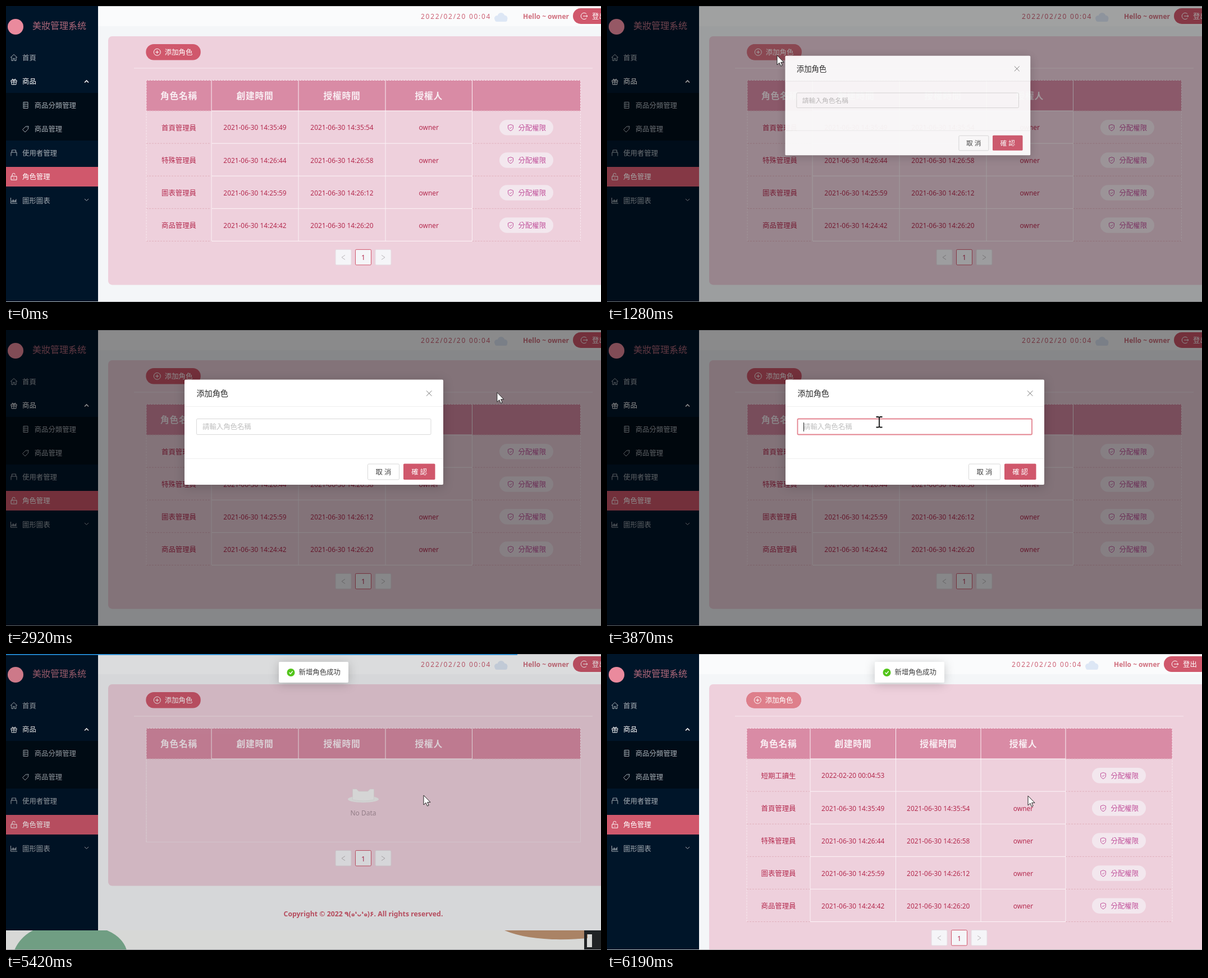
Recreate the animation shown at these times as an HTML page. Size 1060 px wide and 528 px high, loop 6740 ms.

```html
<!DOCTYPE html>
<html lang="zh-Hant">
<head>
<meta charset="utf-8">
<title>角色管理</title>
<style>
html, body { margin: 0; width: 100%; height: 100%; overflow: hidden; }
svg { display: block; width: 100%; height: 100%; font-family: "Noto Sans", "Noto Sans CJK TC", "Noto Sans CJK", "DejaVu Sans", sans-serif; }
text { white-space: pre; }
.pop { filter: drop-shadow(0 3px 9px rgba(0,0,0,.2)); }
.hover { opacity: var(--hover); }
</style>
</head>
<body>
<svg id="stage" viewBox="0 0 1060 528"></svg>
<script>
const LOOP = 6740, MAIN = '#d0586c', LIGHT = '#de7f8b', WINE = '#b52c50';
const MID = 'text-anchor="middle"', BOLD = 'font-weight="700"';
const stage = document.getElementById('stage');

// markup helpers; text is placed by its vertical centre
const text = (x, y, s, fill, size = 12.4, more = '') =>
  `<text x="${x}" y="${y}" dy=".37em" fill="${fill}" font-size="${size}" ${more}>${s}</text>`;
const rect = (x, y, w, h, fill, more = '') =>
  `<rect x="${x}" y="${y}" width="${w}" height="${h}" fill="${fill}" ${more}/>`;
const path = (x, y, d, stroke, more = 'fill="none"') =>
  `<path transform="translate(${x} ${y})" d="${d}" stroke="${stroke}" ${more}/>`;
const icon = (x, y, name, color) => path(x, y, icons[name], color);
const line = (d, color, dash) => path(0, 0, d, color, dash ? 'fill="none" stroke-dasharray="3 2"' : 'fill="none"');

const icons = {
  home: 'M-6 0L0-5.5L6 0M-4-1V5.5H-1.2V1.5H1.2V5.5H4V-1',
  gift: 'M-5-2H5V1H-5ZM-4 1V5.5H4V1M0-2V5.5M0-2C-5-2-3-7 0-2C3-7 5-2 0-2',
  list: 'M-4-5.5H4V5.5H-4ZM-4-1.8H4M-4 1.8H4M-2.2-3.6H-1M-2.2 0H-1M-2.2 3.6H-1',
  tag: 'M-5.5 1L0-4.5L5-5L4.5 0L-1 5.5ZM2-2.4h.8',
  user: 'M-3.5-1V-5H3.5V-1M-5 5.5V-1H5V5.5',
  lock: 'M-5-1H5V5.5H-5ZM-3-1V-3.5A2.6 2.6 0 0 1 2.2-3.8M0 1.4V3.2',
  chart: 'M-5.5-5V5H6M-3.5 3V0M-2 3V-1.5M-.5 3V-1.5M1 3V0M2.5 3V-1M4 3V-2.5',
  shield: 'M0-5.5L4.5-4V0C4.5 3 2 4.8 0 5.5C-2 4.8-4.5 3-4.5 0V-4ZM-2 0L-.5 1.5L2.3-1.5',
  plus: 'M-6 0a6 6 0 1 0 12 0a6 6 0 1 0-12 0M-3 0H3M0-3V3',
  exit: 'M4-4A5.7 5.7 0 1 0 4 4M-2 0H6M4-2L6 0L4 2',
  up: 'M-3.5 2L0-1.5L3.5 2', down: 'M-3.5-2L0 1.5L3.5-2',
  left: 'M3-4L-3 0L3 4', right: 'M-3-4L3 0L-3 4',
  close: 'M-4.7-4.7L4.7 4.7M4.7-4.7L-4.7 4.7'
};

function sidebar(height) {
  const dim = '#a6adb4', white = '#fff';
  const items = [
    ['home', '首頁', 92, dim], ['gift', '商品', 134.5, white],
    ['list', '商品分類管理', 177, dim, 21], ['tag', '商品管理', 219.5, dim, 21],
    ['user', '使用者管理', 262, dim], ['lock', '角色管理', 304.7, white], ['chart', '圖形圖表', 347, dim]
  ];
  return rect(0, 0, 164, height, '#001529') + rect(0, 155, 164, 85, '#000c17') + rect(0, 287, 164, 35, MAIN) +
    '<circle cx="17" cy="37" r="14" fill="#ea8a9d"/>' +
    text(47, 35, '美妝管理系统', '#b0687a', 16, 'font-weight="500"') +
    items.map(([name, label, y, color, indent = 0]) =>
      icon(14 + indent, y, name, color) + text(29 + indent * 1.03, y, label, color)).join('') +
    path(143.5, 134.5, icons.up, white, 'fill="none" stroke-width="1.6"') + icon(143.5, 346, 'down', dim);
}

function topbar(dx) {
  const cloud = [[875, 22, 5], [882, 18.5, 6.5], [888, 22, 5.5]]
    .map(([x, y, r]) => `<circle cx="${x}" cy="${y}" r="${r}"/>`).join('') + rect(871, 21, 22, 7, '#dde7f5', 'rx="3.5"');
  return rect(164, 0, 896, 36, '#fafbfc') +
    `<g transform="translate(${dx} 0)"><g fill="#dde7f5">${cloud}</g>` +
    text(739, 18.5, '2022/02/20 00:04', '#cc6175', 12, 'letter-spacing="1.72"') +
    text(921, 18.5, 'Hello ~ owner', '#d0707f', 12, BOLD) +
    rect(1010, 4, 80, 28, MAIN, 'rx="14"') + icon(1030, 18, 'exit', '#fff') + text(1044, 18, '登出', '#fff') + '</g>';
}

const oldRows = [
  ['首頁管理員', '2021-06-30 14:35:49', '2021-06-30 14:35:54', 'owner'],
  ['特殊管理員', '2021-06-30 14:26:44', '2021-06-30 14:26:58', 'owner'],
  ['圖表管理員', '2021-06-30 14:25:59', '2021-06-30 14:26:12', 'owner'],
  ['商品管理員', '2021-06-30 14:24:42', '2021-06-30 14:26:20', 'owner']
];
const newRow = ['短期工讀生', '2022-02-20 00:04:53', '', ''];
const wide = [250, 366, 521, 676, 830.5, 1023.5], narrow = [249, 362, 514.5, 666, 817, 1007];

function table(cols, rows) {
  const [a, b, , , e, f] = cols, top = 132.5, head = 187, step = 58.1;
  const bottom = rows.length ? head + rows.length * step : 335.5;
  const mid = i => (cols[i] + cols[i + 1]) / 2;
  let out = rect(a, top, f - a, head - top, '#d98ba5');
  ['角色名稱', '創建時間', '授權時間', '授權人'].forEach((s, i) =>
    out += text(mid(i), 160, s, '#f9eef3', 15.8, `${MID} ${BOLD} letter-spacing=".7"`));
  rows.forEach((row, r) => {
    const y = head + (r + .5) * step + 1, low = head + (r + 1) * step;
    row.forEach((s, i) => out += text(mid(i), y, s, WINE, i ? 11.9 : 12.4, MID));
    out += rect(mid(4) - 48, y - 14, 96, 27.5, '#f3e7ee', 'rx="13.7"') +
      icon(mid(4) - 28, y, 'shield', '#c0509a') + text(mid(4) - 14.5, y, '分配權限', '#c0509a') +
      line(`M${a} ${low}H${b}M${e} ${low}H${f}`, '#e0b0bc', true) + line(`M${b} ${low}H${e}`, '#fdf5f8');
  });
  const end = rows.length ? bottom : head;
  out += cols.slice(1, 5).map(x => line(`M${x} ${top}V${end}`, '#fbf1f5')).join('') +
    line(`M${b} ${head}H${e}`, '#fff') + line(`M${a} ${head}H${b}M${e} ${head}H${f}`, '#e3b4c2', true) +
    line(`M${a} ${bottom}V${top}H${f}V${bottom}`, '#f8e9ef', true);
  if (!rows.length) out += line(`M${a} ${head}V${bottom}H${f}V${head}`, '#f1dfe7') +
    '<ellipse cx="636.5" cy="259" rx="27.5" ry="6" fill="#efefef"/>' +
    path(636.5, 250, 'M-19-9H-12L-8-5H8L12-9H19V10Q0 14-19 10Z', '#ddd', 'fill="#f3f3f3" stroke-width=".5"') +
    text(636.5, 283.5, 'No Data', '#a88f9b', 12, MID);
  return [out, bottom];
}

// picture behind the layout, seen below a short page
const backdrop = '<path d="M15 528Q25 505 48 493H180Q208 505 215 528Z" fill="#80b596"/>' +
  '<path d="M888 493H1036V507Q940 515 888 493Z" fill="#c29673"/>' +
  '<path d="M1030 493H1060V528H1030ZM1035 500V523H1044V500Z" fill="#25282a" fill-rule="evenodd"/>';

function page(cols, rows) {
  const [grid, bottom] = table(cols, rows), empty = !rows.length;
  const shift = cols === narrow ? -18 : 0, height = empty ? 493 : 528;
  const x = cols[0] - .7, y = bottom + 15, c = 636.5 + shift / 2;
  let out = rect(0, 0, 1060, 528, '#f6f7f5') + backdrop +
    rect(164, 0, 896, height, '#f4f6f8') + topbar(shift) +
    rect(182, 54, 900, bottom + 24, '#eed0dc', 'rx="7"') +
    line(`M228 111H${1045 + shift}`, '#f8e8ee') +
    rect(x, 68, 97.5, 28.5, MAIN, 'rx="14"') + rect(x, 68, 97.5, 28.5, LIGHT, 'rx="14" class="hover"') +
    icon(x + 20, 82.3, 'plus', '#fff') + text(x + 33.5, 82.5, '添加角色', '#fff') + grid;
  ['left', 0, 'right'].forEach((name, i) => {
    const px = c + (i - 1) * 35.5;
    out += rect(px - 14, y, 28, 27.5, '#f5f5f8', `rx="1.8" stroke="${name ? '#e4dbe1' : MAIN}"`) +
      (name ? icon(px, y + 14, name, '#b9b5b8') : text(px, y + 14.5, '1', WINE, 12.2, MID));
  });
  if (empty) out += text(636.5, 463, 'Copyright © 2022 ٩(๑❛ᴗ❛๑)۶. All rights reserved.', '#d0586c', 12.3,
    `${MID} font-weight="600" style="unicode-bidi:bidi-override"`);
  return `<g>${out}${sidebar(height)}${line('M164 .5H1060M0 527.5H1060', '#b4b6b9')}</g>`;
}

const modal = '<g id="modal">' + rect(318, 88.5, 461, 187.5, '#fff', 'rx="2" class="pop"') +
  text(339.5, 113, '添加角色', '#262626', 14.1) + icon(753.7, 113, 'close', '#777') +
  line('M318 136.5H779M318 229.5H779', '#efefef') +
  rect(339.5, 158.5, 417.5, 28, '#fff', 'id="field" rx="1.8"') +
  text(350, 172.8, '', '#bfbfbf', 12.4, 'id="entry"') + rect(350, 165, 1, 16, '#222', 'id="caret"') +
  rect(644.5, 239, 56, 28, '#fff', 'rx="1.8" stroke="#d9d9d9"') + text(672.5, 253, '取 消', '#444', 12.4, MID) +
  rect(708, 238.5, 56.5, 28.5, MAIN, 'id="confirm" rx="1.8"') + text(736.2, 253, '確 認', '#fff', 12.4, MID) + '</g>';

const notice = '<g id="notice">' + rect(486, 14, 124, 37, '#fff', 'rx="2" class="pop"') +
  '<circle cx="507.5" cy="33" r="7" fill="#52c41a"/>' +
  path(507.5, 33, 'M-3 0L-.7 2.4L3.2-2.4', '#fff', 'fill="none" stroke-width="1.5"') +
  text(521.5, 32.5, '新增角色成功', '#3d3d3d') + '</g>';

const cursor = '<g id="cursor">' +
  path(0, 0, 'M0 0V17L4 13.3L6.6 19.2L9.2 18L6.7 12.4H12Z', '#222', 'fill="#fff"') +
  path(0, 0, 'M-1.7 12V1.7a1.7 1.7 0 0 1 3.4 0V7.5l6.6 1.4q2 .5 1.7 2.5L9 18q-.5 3-3 3.5H1Q-1 21-2 19L-7 12.5q0-2.5 2.5-1.5ZM1.7 7.5V11M4.5 8V11.3M7.2 8.6V11.8', '#222', 'fill="#fff"') +
  path(0, 0, 'M-5.5-9H-1.5L0-8L1.5-9H5.5M-5.5 9.5H-1.5L0 8.5L1.5 9.5H5.5M0-8V8.5', '#111', 'fill="none" stroke-width="1.8"') + '</g>';

stage.innerHTML = '<g id="pages">' + page(wide, oldRows) + page(wide, []) + page(narrow, [newRow, ...oldRows]) + '</g>' +
  rect(0, 0, 1060, 528, '#000', 'id="mask"') + modal + notice + rect(0, 0, 0, 1.8, '#2388cf', 'id="bar"') + cursor;

const el = id => document.getElementById(id);
const set = (node, attrs) => { for (const k in attrs) node.setAttribute(k, attrs[k]); };
const clamp = v => Math.min(1, Math.max(0, v));

function bezier(x1, y1, x2, y2) {
  const f = (a, b, u) => 3 * a * u * (1 - u) ** 2 + 3 * b * u * u * (1 - u) + u ** 3;
  return x => {
    let lo = 0, hi = 1;
    for (let i = 0; i < 20; i++) {
      const m = (lo + hi) / 2;
      if (f(x1, x2, m) < x) lo = m; else hi = m;
    }
    return f(y1, y2, lo);
  };
}
const ease = bezier(.25, .1, .25, 1), zoomIn = bezier(.08, .82, .17, 1), zoomOut = bezier(.78, .14, .15, .86);

// linear track of [time, ...values]
function track(keys, t) {
  const i = keys.findIndex(k => k[0] > t);
  if (i < 0) return keys[keys.length - 1].slice(1);
  if (i === 0) return keys[0].slice(1);
  const a = keys[i - 1], b = keys[i], p = (t - a[0]) / (b[0] - a[0]);
  return a.slice(1).map((v, j) => v + (b[j + 1] - v) * p);
}

const pointer = [
  [360, 944, 466], [480, 890, 430], [820, 380, 135], [970, 283, 81], [1060, 303, 88], [1430, 303, 88],
  [1690, 367, 99], [1830, 727, 165], [1900, 760, 172], [2800, 952, 193], [2960, 850, 85], [3060, 735, 57],
  [3220, 590, 105], [3400, 488, 162], [3640, 485, 160], [3720, 485, 164], [4170, 485, 164],
  [4480, 640, 224], [4790, 744, 252], [6110, 744, 252], [6180, 750, 253]
];
const progress = [[4940, 0], [5110, 85], [5260, 112], [5340, 560], [5420, 910], [5570, 1060]];
const hover = [[1000, 0], [1060, 1], [1200, 1], [1430, 0], [5490, 0], [5720, 1]];

function draw(t) {
  const mode = t < 5340 ? 0 : t < 5490 ? 1 : 2;
  [...el('pages').children].forEach((g, i) => set(g, { display: i === mode ? 'inline' : 'none' }));
  stage.style.setProperty('--hover', track(hover, t)[0]);

  const enter = clamp((t - 1155) / 300), leave = clamp((t - 5276) / 200);
  set(el('mask'), { opacity: .45 * (ease(clamp((t - 1130) / 300)) - leave) });
  const shown = zoomIn(enter) - zoomOut(leave), s = .2 + .8 * shown;
  const open = enter > 0 && leave < 1;
  set(el('modal'), {
    display: open ? 'inline' : 'none', opacity: leave ? shown * shown : shown,
    transform: `translate(307 92) scale(${s}) translate(-307 -92)`
  });

  const focus = t >= 3480 && t < 4940, near = t >= 3390 && t < 3480;
  set(el('field'), { stroke: focus || near ? '#e3838f' : '#d9d9d9', 'stroke-width': focus ? 1 + clamp((t - 3480) / 240) * .8 : 1 });
  const typed = t >= 3940 && t < 5110 ? Math.min(5, 1 + Math.floor((t - 3940) / 76)) : 0;
  el('entry').textContent = typed ? newRow[0].slice(0, typed) : '請輸入角色名稱';
  set(el('entry'), { fill: typed ? '#555' : '#bfbfbf' });
  set(el('caret'), { x: 350 + typed * 12.4, opacity: focus && t > 3640 && (t < 4560 || t > 4790) ? 1 : 0 });

  const [x, y] = track(pointer, t);
  const onConfirm = open && x > 708 && x < 765 && y > 238;
  set(el('confirm'), { fill: onConfirm ? LIGHT : MAIN });

  set(el('bar'), { width: track(progress, t)[0], opacity: clamp((5700 - t) / 100) });
  const drop = clamp((t - 5320) / 90);
  set(el('notice'), { opacity: drop, transform: `translate(${mode === 2 ? -9 : 0} ${(drop - 1) * 30})` });

  const onAdd = t < 1130 && x < 347 && y < 97;
  const onField = open && x > 339 && x < 757 && y > 158 && y < 187;
  const kind = onAdd || onConfirm && t < 5340 ? 1 : onField ? 2 : 0;
  const seen = t >= 360 && t < 1900 || t >= 2800;
  set(el('cursor'), { transform: `translate(${x} ${y})`, display: seen ? 'inline' : 'none' });
  [...el('cursor').children].forEach((p, i) => set(p, { display: i === kind ? 'inline' : 'none' }));
}

function frame(now) {
  draw(now % LOOP);
  requestAnimationFrame(frame);
}
requestAnimationFrame(frame);
</script>
</body>
</html>
```
